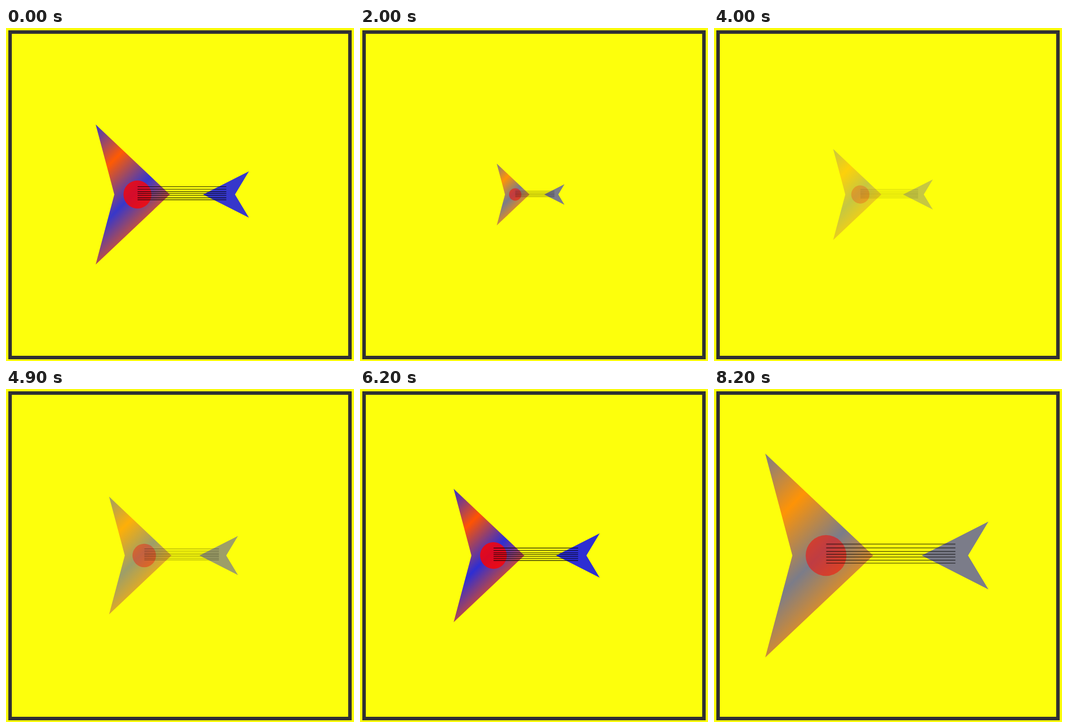
An HTML page for the animation above (8300 ms loop, 600x574 px).

```html
<!DOCTYPE html>
<html lang="en">
<head>
<meta charset="utf-8">
<title>Pulsing guitar</title>
<style>
html, body { margin: 0; width: 100%; height: 100%; overflow: hidden; background: #fdff0c; }
svg { display: block; width: 100vw; height: 100vh; }
</style>
</head>
<body>
<svg viewBox="0 0 600 574">
  <defs>
    <!-- 135deg gradient across the body's bounding box -->
    <linearGradient id="paint" gradientUnits="userSpaceOnUse" x1="-174" y1="-92.5" x2="11" y2="92.5">
      <stop offset="0" stop-color="#00f"/>
      <stop offset=".25" stop-color="#ff2d00"/>
      <stop offset=".5" stop-color="#00f"/>
      <stop offset=".75" stop-color="#ff2d00"/>
      <stop offset="1" stop-color="#00f"/>
    </linearGradient>
  </defs>
  <rect width="600" height="574" fill="#fdff0c"/>
  <rect x="7" y="7" width="586" height="561" fill="none" stroke="#303033" stroke-width="6"/>
  <g id="guitar">
    <path class="part" fill="url(#paint)" d="M-145.7-121L-17.6 0L-145.7 121L-113.5 0Z"/>
    <circle class="part" cx="-73.5" r="24.2" fill="#f00"/>
    <path class="part" fill="#00f" d="M40 0L119.2-40.2L95 0L119.2 40.2Z"/>
    <path class="part" id="strings" stroke="#000" stroke-width="1.15" fill="none"/>
  </g>
</svg>
<script>
const LOOP = 8300, STEP = 100;
const PULSE = 2502, PEAK = 3104, MAX = 1.545, RATE = 0.001;
const FADE = 3100, DARK = 1230, RAMP = 1500;

const guitar = document.getElementById('guitar');
const parts = document.querySelectorAll('.part');
const stringYs = [-13.5, -9, -4.7, -1.5, 1.8, 5.6, 9.1];
document.getElementById('strings')
  .setAttribute('d', stringYs.map(y => `M-73.3 ${y}H80`).join(''));

// Distance in time to the nearest moment of a repeating event
const gap = (t, at, period) => {
  const d = (((t - at) % period) + period) % period;
  return Math.min(d, period - d);
};

function draw(time) {
  const t = Math.floor((time % LOOP) / STEP) * STEP;
  const u = t + 55 * Math.max(0, 1 - t / 2000); // small head start
  const scale = MAX - RATE * gap(u, PEAK, PULSE);
  let alpha = Math.min(1, gap(u, DARK, FADE) / RAMP);
  if (alpha < 0.02) alpha = 0;
  guitar.setAttribute('transform', `translate(300 287) scale(${scale})`);
  parts.forEach(p => p.setAttribute('opacity', alpha));
}

const start = performance.now();
function tick() {
  draw(performance.now() - start);
  requestAnimationFrame(tick);
}
tick();
</script>
</body>
</html>
```
